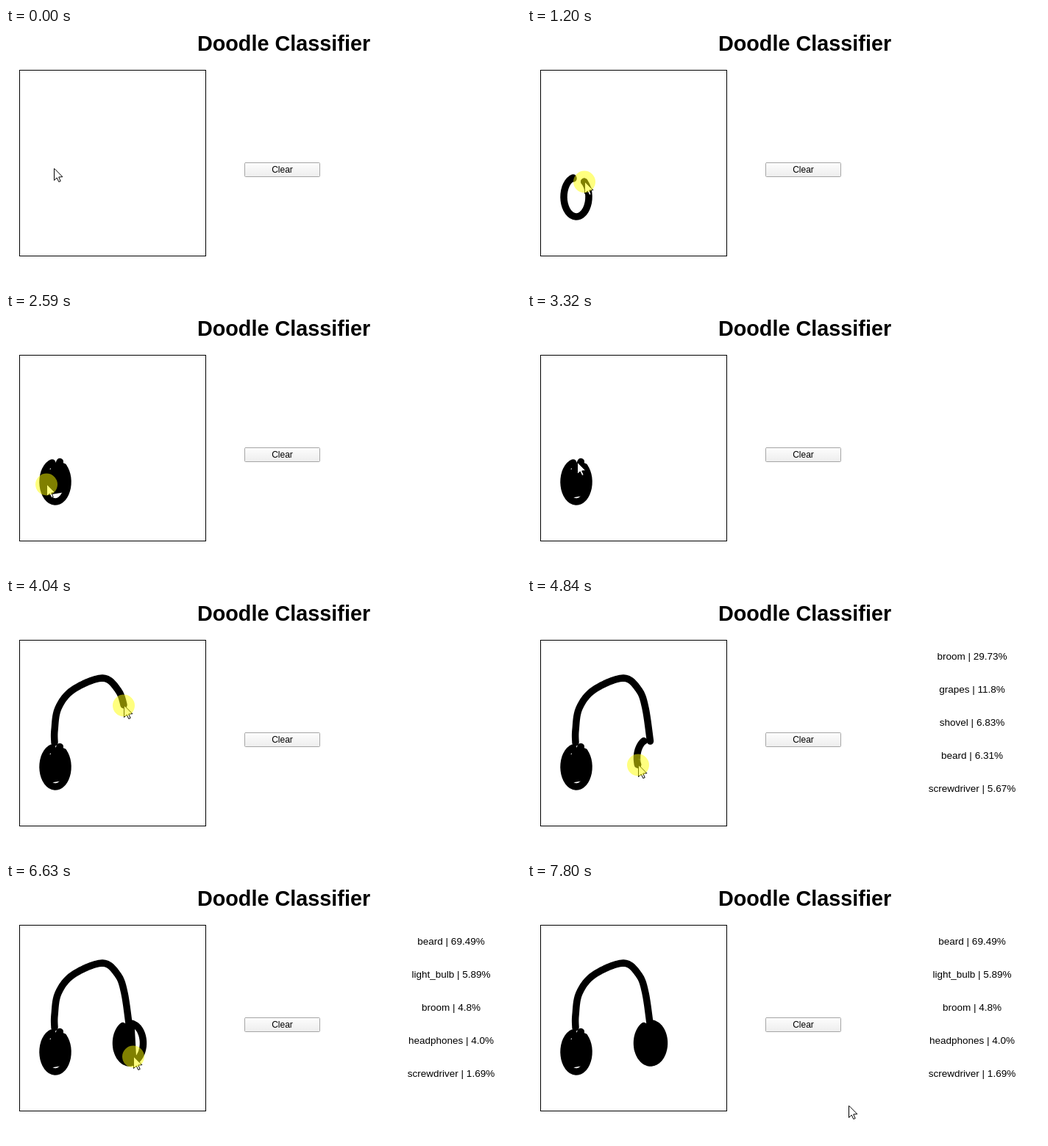
An HTML page with a canvas for the animation above (8000 ms loop, 700 by 350 pixels).

```html
<!DOCTYPE html>
<html lang="en">
<head>
<meta charset="utf-8">
<title>Doodle Classifier</title>
<style>
  html, body { margin: 0; width: 100%; height: 100%; overflow: hidden; background: #fff; }
  canvas { display: block; }
</style>
</head>
<body>
<canvas id="stage" width="700" height="350"></canvas>
<script>
const ctx = document.getElementById('stage').getContext('2d');
const LOOP = 8000;
const FONT = '"Liberation Sans", Arial, sans-serif';

const series = (count, fn) => Array.from({ length: count + 1 }, (_, i) => fn(i / count, i));

// Part of an ellipse outline between two angles in degrees.
const arc = ({ x, y, rx, ry }, from, to) => series(32, k => {
  const a = (from + (to - from) * k) * Math.PI / 180;
  return [x + rx * Math.cos(a), y + ry * Math.sin(a)];
});

// Zigzag that shades an ellipse between two relative heights, leaning sideways.
const shadeRows = ({ x, y, rx, ry, lean }, from, to, legs) => series(legs, (k, i) => {
  const u = from + (to - from) * k;
  const side = (legs - i) % 2 ? 1 : -1;
  return [x - lean * u + side * rx * Math.sqrt(Math.max(0, 1 - u * u)), y + ry * u];
});

// The same zigzag turned by a quarter, going from column to column.
const shadeColumns = ({ x, y, rx, ry }, from, to, legs) =>
  shadeRows({ x: y, y: x, rx: ry, ry: rx, lean: 0 }, from, to, legs).map(([a, b]) => [2 * y - a, b].reverse());

// Catmull-Rom curve through the key points.
function curve(keys) {
  const at = i => keys[Math.max(0, Math.min(keys.length - 1, i))];
  return keys.slice(1).flatMap((_, i) => series(8, t => [0, 1].map(axis => {
    const [a, b, c, d] = [-1, 0, 1, 2].map(offset => at(i + offset)[axis]);
    return b + t * ((c - a) + t * ((2 * a - 5 * b + 4 * c - d) + t * (3 * b - a - 3 * c + d))) / 2;
  })));
}

const leftEar = { x: 67, y: 230, rx: 17, ry: 27 };
const leftFill = { x: 67, y: 230, rx: 11.5, ry: 22, lean: 5 };
const rightEar = { x: 168, y: 218, rx: 18.5, ry: 27 };
const rightFill = { x: 168, y: 218, rx: 18, ry: 23 };
const band = curve([[66, 197], [66, 180], [71, 150], [91, 125], [131, 109], [152, 125], [161, 150], [167.5, 195]]);

// Every move continues from where the previous one ended.
const moves = [];
let last = [65, 191];
function move(start, end, down, points) {
  points = [last, ...points];
  const lengths = points.slice(1).map(([x, y], i) => Math.hypot(x - points[i][0], y - points[i][1]));
  moves.push({ start, end, down, points, lengths, total: lengths.reduce((a, b) => a + b) });
  last = points[points.length - 1];
}
const glide = (start, end, ...points) => move(start, end, false, points);
const stroke = (start, end, points) => move(start, end, true, points);

glide(30, 180, [63, 205]);
stroke(410, 1200, arc(leftEar, -105, -410));
stroke(1200, 2050, shadeRows(leftFill, -1, 0.6, 11));
stroke(2050, 2590, shadeRows(leftFill, -1.25, 0.15, 8));
stroke(2590, 3060, shadeRows(leftFill, 0.15, 0.8, 5));
glide(3060, 3320, [68, 203]);
glide(3320, 3420, band[0]);
stroke(3420, 4220, band);
glide(4220, 4560, [159, 195]);
stroke(4590, 4840, arc(rightEar, -120, -199));
stroke(4840, 5390, arc(rightEar, -199, -440));
stroke(5390, 5820, shadeColumns(rightFill, -0.15, -0.97, 5));
stroke(5820, 7010, [...shadeColumns(rightFill, -0.85, 0.8, 12), [176, 225]]);
glide(7080, 7800, [437, 303]);

const results = [
  [4300, ['broom | 29.73%', 'grapes | 11.8%', 'shovel | 6.83%', 'beard | 6.31%', 'screwdriver | 5.67%']],
  [5500, ['beard | 69.49%', 'light_bulb | 5.89%', 'broom | 4.8%', 'headphones | 4.0%', 'screwdriver | 1.69%']]
];

// The part of a move's path that has been travelled at time t.
function travelled({ start, end, down, points, lengths, total }, t) {
  let p = Math.min(1, (t - start) / (end - start));
  if (!down) p = p * p * (3 - 2 * p);
  let left = p * total;
  const path = [points[0]];
  for (let i = 0; i < lengths.length; i++) {
    const [x, y] = points[i], [nx, ny] = points[i + 1];
    const k = lengths[i] ? Math.min(1, left / lengths[i]) : 1;
    path.push([x + (nx - x) * k, y + (ny - y) * k]);
    if (k < 1) break;
    left -= lengths[i];
  }
  return path;
}

function polyline(points) {
  ctx.beginPath();
  for (const [x, y] of points) ctx.lineTo(x, y);
}

function label(text, x, y, font) {
  ctx.font = font + ' ' + FONT;
  ctx.fillStyle = '#000';
  ctx.fillText(text, x, y);
}

function drawPage() {
  ctx.fillStyle = '#fff';
  ctx.fillRect(0, 0, 700, 350);
  ctx.textAlign = 'center';
  label('Doodle Classifier', 377.5, 31, 'bold 28.8px');

  ctx.lineWidth = 1;
  ctx.lineJoin = 'miter';
  ctx.strokeStyle = '#000';
  ctx.strokeRect(18.5, 57.5, 253, 253);

  const shade = ctx.createLinearGradient(0, 183, 0, 203);
  shade.addColorStop(0, '#fdfdfd');
  shade.addColorStop(1, '#ededed');
  ctx.fillStyle = shade;
  ctx.strokeStyle = '#a6a6a6';
  ctx.beginPath();
  ctx.roundRect(324.5, 183.5, 102, 19, 1);
  ctx.fill();
  ctx.stroke();
  label('Clear', 375.5, 197, '12px');
}

function drawCursor(x, y, down) {
  ctx.save();
  ctx.translate(Math.round(x) + 0.5, Math.round(y) + 0.5);
  polyline([[0, 0], [0, 16], [3.7, 12.5], [6.3, 18], [8.7, 17], [6.2, 11.5], [11, 11.2]]);
  ctx.closePath();
  ctx.lineWidth = 1;
  ctx.lineJoin = 'miter';
  ctx.fillStyle = '#fff';
  ctx.strokeStyle = '#000';
  ctx.fill();
  ctx.stroke();
  if (down) {
    ctx.beginPath();
    ctx.arc(-0.5, 0, 15, 0, 2 * Math.PI);
    ctx.fillStyle = 'rgba(255, 255, 0, 0.5)';
    ctx.fill();
  }
  ctx.restore();
}

function draw(t) {
  drawPage();

  let cursor = moves[0].points[0], down = false;
  ctx.lineCap = ctx.lineJoin = 'round';
  ctx.lineWidth = 9.5;
  ctx.strokeStyle = '#000';
  for (const step of moves) {
    if (t < step.start) break;
    const path = travelled(step, t);
    if (step.down) {
      polyline(path);
      ctx.stroke();
    }
    cursor = path[path.length - 1];
    down = step.down && t <= step.end + 20;
  }

  const shown = results.filter(([start]) => t >= start).pop();
  if (shown) shown[1].forEach((text, i) => label(text, 605, 84 + 45 * i, '13.5px'));

  drawCursor(...cursor, down);
}

function tick() {
  draw(performance.now() % LOOP);
  requestAnimationFrame(tick);
}
tick();
</script>
</body>
</html>
```
